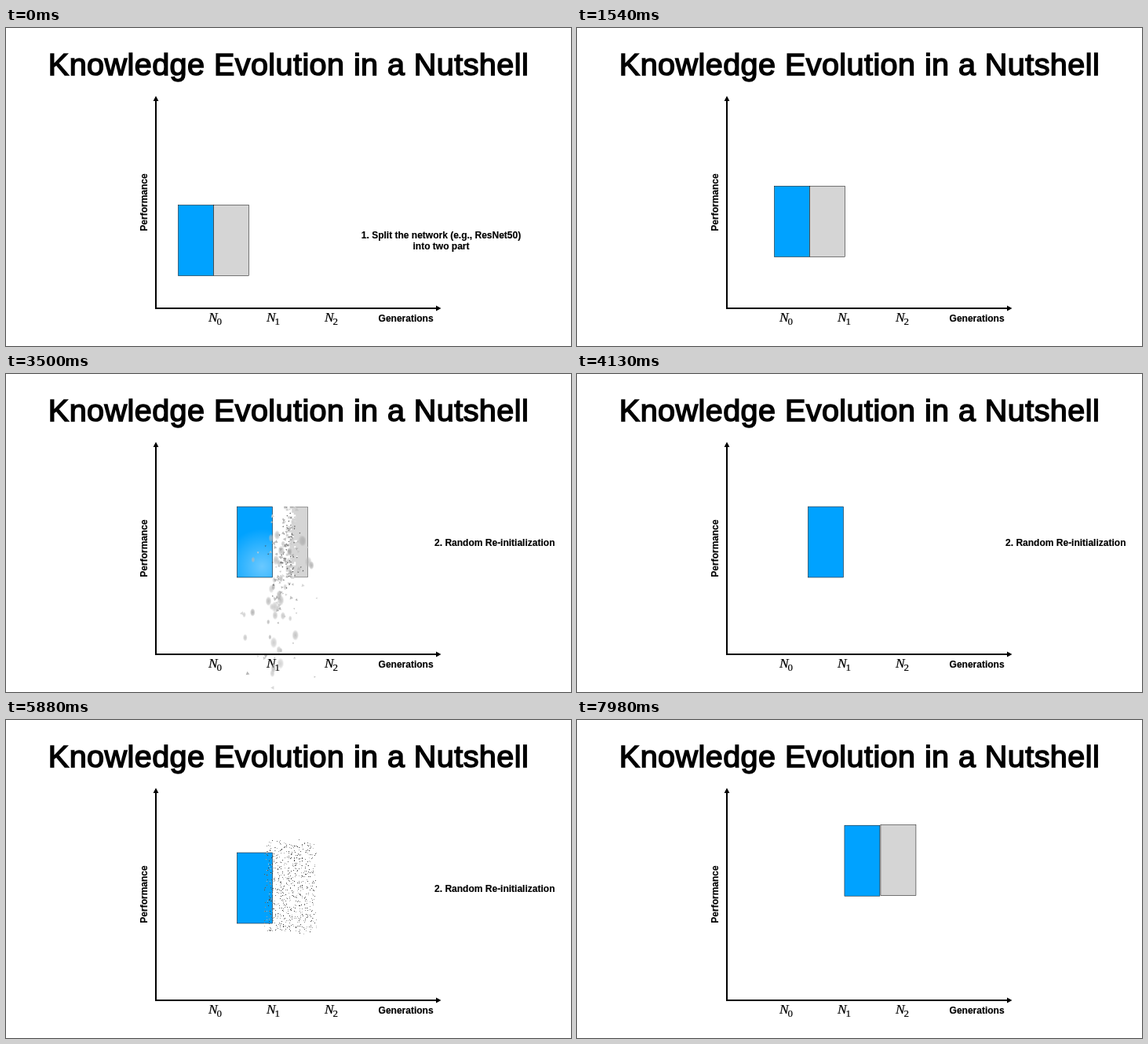
These frames come from a looping animation (720x405 px, 8 s). An HTML page with a canvas:

```html
<!DOCTYPE html>
<html lang="en">
<head>
<meta charset="utf-8">
<title>Knowledge Evolution in a Nutshell</title>
<style>
  html, body { margin: 0; width: 100%; height: 100%; overflow: hidden; background: #fff; }
  svg, canvas { position: absolute; left: 0; top: 0; width: 720px; height: 405px; }
  text { font-family: "Liberation Sans", Arial, sans-serif; }
  .title { font-size: 39.6px; letter-spacing: .42px; stroke: #000; stroke-width: 1.5px; }
  .note { font-size: 12px; font-weight: bold; stroke: #000; stroke-width: .15px; }
  .math { font-family: "Liberation Serif", "Times New Roman", serif; font-size: 17.5px; font-style: italic; stroke: #000; stroke-width: .2px; }
  .sub { font-family: "Liberation Serif", "Times New Roman", serif; font-size: 13px; stroke: #000; stroke-width: .2px; }
  .axis { fill: none; stroke: #000; stroke-width: 2; }
</style>
</head>
<body>
<svg viewBox="0 0 720 405">
  <text class="title" x="360" y="59.7" text-anchor="middle">Knowledge Evolution in a Nutshell</text>
  <path class="axis" d="M191 92V357H549"/>
  <path d="M191 86.5l3.4 6.5h-6.8zM554.5 357l-6.5 3.4v-6.8z"/>
  <text class="note" text-anchor="middle" transform="translate(180 222) rotate(-90)">Performance</text>
  <text class="note" x="509.6" y="374" text-anchor="middle">Generations</text>
  <g id="ticks">
    <text class="math" x="258" y="374">N</text><text class="sub" x="268.5" y="377.5">0</text>
    <text class="math" x="332" y="374">N</text><text class="sub" x="342.5" y="377.5">1</text>
    <text class="math" x="406" y="374">N</text><text class="sub" x="416.5" y="377.5">2</text>
  </g>
  <g id="split" class="note" text-anchor="middle">
    <text x="554.5" y="267.5">1. Split the network (e.g., ResNet50)</text>
    <text x="554.5" y="282">into two part</text>
  </g>
  <text id="reinit" class="note" x="622.8" y="218.5" text-anchor="middle">2. Random Re-initialization</text>
</svg>
<canvas id="stage" width="720" height="405"></canvas>
<script>
const LOOP = 8000, STEP = 70;
const W = 45, H = 90, CELL = 2.5, COLS = W / CELL, ROWS = H / CELL;
const BLUE = '#00a2ff', GREY = '#d5d5d5';
const ctx = document.getElementById('stage').getContext('2d');
const split = document.getElementById('split');
const reinit = document.getElementById('reinit');

const clamp = v => Math.min(1, Math.max(0, v));
const ease = p => (1 - Math.cos(Math.PI * clamp(p))) / 2;

// Repeatable random value for item i, channel k
function rnd(i, k) {
  let h = Math.imul(i + 1, 0x9E3779B1) ^ Math.imul(k + 1, 0x85EBCA6B);
  h = Math.imul(h ^ (h >>> 15), 0x2C1B3C6D);
  h = Math.imul(h ^ (h >>> 13), 0x297A2D39);
  return ((h ^ (h >>> 16)) >>> 0) / 4294967296;
}

const cells = Array.from({ length: COLS * ROWS }, (_, i) => ({
  i, x: (i % COLS) * CELL, y: Math.floor(i / COLS) * CELL
}));

function outline(x, y) {
  ctx.strokeStyle = '#000';
  ctx.lineWidth = .5;
  ctx.strokeRect(x, y, W, H);
}

function box(x, y, color) {
  ctx.fillStyle = color;
  ctx.fillRect(x, y, W, H);
  outline(x, y);
}

function glow(x, y, s) {
  const cx = x + 32, cy = y + 76;
  const g = ctx.createRadialGradient(cx, cy, 0, cx, cy, 48);
  g.addColorStop(0, `rgba(255,255,255,${.42 * Math.sin(Math.PI * clamp(s / .7))})`);
  g.addColorStop(1, 'rgba(255,255,255,0)');
  ctx.fillStyle = g;
  ctx.fillRect(x + .5, y + .5, W - 1, H - 1);
}

function shard(x, y, size, turn) {
  ctx.beginPath();
  for (let k = 0; k < 3; k++) {
    const a = turn + k * 2.1;
    ctx.lineTo(x + size * Math.cos(a), y + size * Math.sin(a));
  }
  ctx.fill();
}

// A piece blurred along its fall
function smudge(x, y, r, shade) {
  ctx.save();
  ctx.translate(x, y);
  ctx.scale(1, 1.6);
  const g = ctx.createRadialGradient(0, 0, 0, 0, 0, r);
  g.addColorStop(0, `rgba(${shade},${shade},${shade},.75)`);
  g.addColorStop(.6, `rgba(${shade},${shade},${shade},.5)`);
  g.addColorStop(1, `rgba(${shade},${shade},${shade},0)`);
  ctx.fillStyle = g;
  ctx.fillRect(-r, -r, 2 * r, 2 * r);
  ctx.restore();
}

// The box crumbles from left to right and its pieces drop
function crumble(x, y, s) {
  const solid = new Path2D(), loose = [];
  for (const c of cells) {
    const age = s - .42 * c.x / W - .18 * rnd(c.i, 0);
    if (age < 0) solid.rect(x + c.x - .3, y + c.y - .3, CELL + .6, CELL + .6);
    else loose.push([c, age]);
  }
  ctx.save();
  ctx.fillStyle = GREY;
  ctx.clip(solid);
  ctx.fillRect(x, y, W, H);
  outline(x, y);
  ctx.restore();

  for (const [{ i, x: cx, y: cy }, age] of loose) {
    const kind = rnd(i, 1);
    if (kind > .5 && age > .07) continue;
    const spread = rnd(i, 2) - .5;
    const px = x + cx + 1 + (spread * 30 + spread ** 3 * 2200) * age;
    const py = y + cy + 1 + (rnd(i, 3) * 380 - 70) * age + 1650 * age * age;
    if (kind < .2 && age > .08) {
      smudge(px, py, 2 + 2.6 * rnd(i, 4), 150 + 50 * rnd(i, 5));
      continue;
    }
    const shade = kind > .43 ? 70 : 165 + 50 * rnd(i, 5);
    ctx.fillStyle = `rgba(${shade},${shade},${shade},.9)`;
    shard(px, py, kind > .43 ? 1.1 : 1.3 + 1.6 * rnd(i, 6), rnd(i, 7) * 6 + age * 12);
  }
}

// Specks draw in from a wider cloud and grow into the box
function gather(x, y, p) {
  const e = ease(p), away = 1 - e;
  const size = Math.max(1, CELL * e ** 2);
  for (const c of cells) {
    const dx = (c.x / W * 2 - .95) * 24 + (rnd(c.i, 8) * 2 - 1) * 11;
    const dy = (c.y / H * 2 - .97) * 35 + (rnd(c.i, 9) * 2 - 1) * 12;
    const px = Math.round(x + c.x + dx * away);
    const py = Math.round(y + c.y + dy * away);
    const dark = 50 + 150 * rnd(c.i, 10);
    const shade = dark + (213 - dark) * clamp((e - .65) / .33);
    ctx.fillStyle = `rgb(${shade},${shade},${shade})`;
    ctx.fillRect(px, py, size, size);
  }
}

function draw(t) {
  const m1 = ease((t - 1087) / 1000), m2 = ease((t - 7398) / 1000);
  const x = 219.5 + 75 * m1 + 74 * m2;
  const y = 225.5 - 56.5 * m1 - 55.5 * m2;
  const newX = x + 46, newY = y - .5;

  split.style.visibility = t < 1120 ? 'visible' : 'hidden';
  reinit.style.visibility = t >= 3220 && t < 7420 ? 'visible' : 'hidden';

  ctx.clearRect(0, 0, 720, 405);
  box(x, y, BLUE);
  if (t < 3220) box(x + W, y, GREY);
  else if (t < 4130) {
    const s = (t - 3187) / 1000;
    glow(x, y, s);
    crumble(x + W, y, s);
  }
  else if (t >= 6300) box(newX, newY, GREY);
  else if (t >= 5320) gather(newX, newY, (t - 5287) / 1000);
}

const start = performance.now();
function tick() {
  const t = (performance.now() - start) % LOOP;
  draw(Math.floor(t / STEP) * STEP);
  requestAnimationFrame(tick);
}
tick();
</script>
</body>
</html>
```
